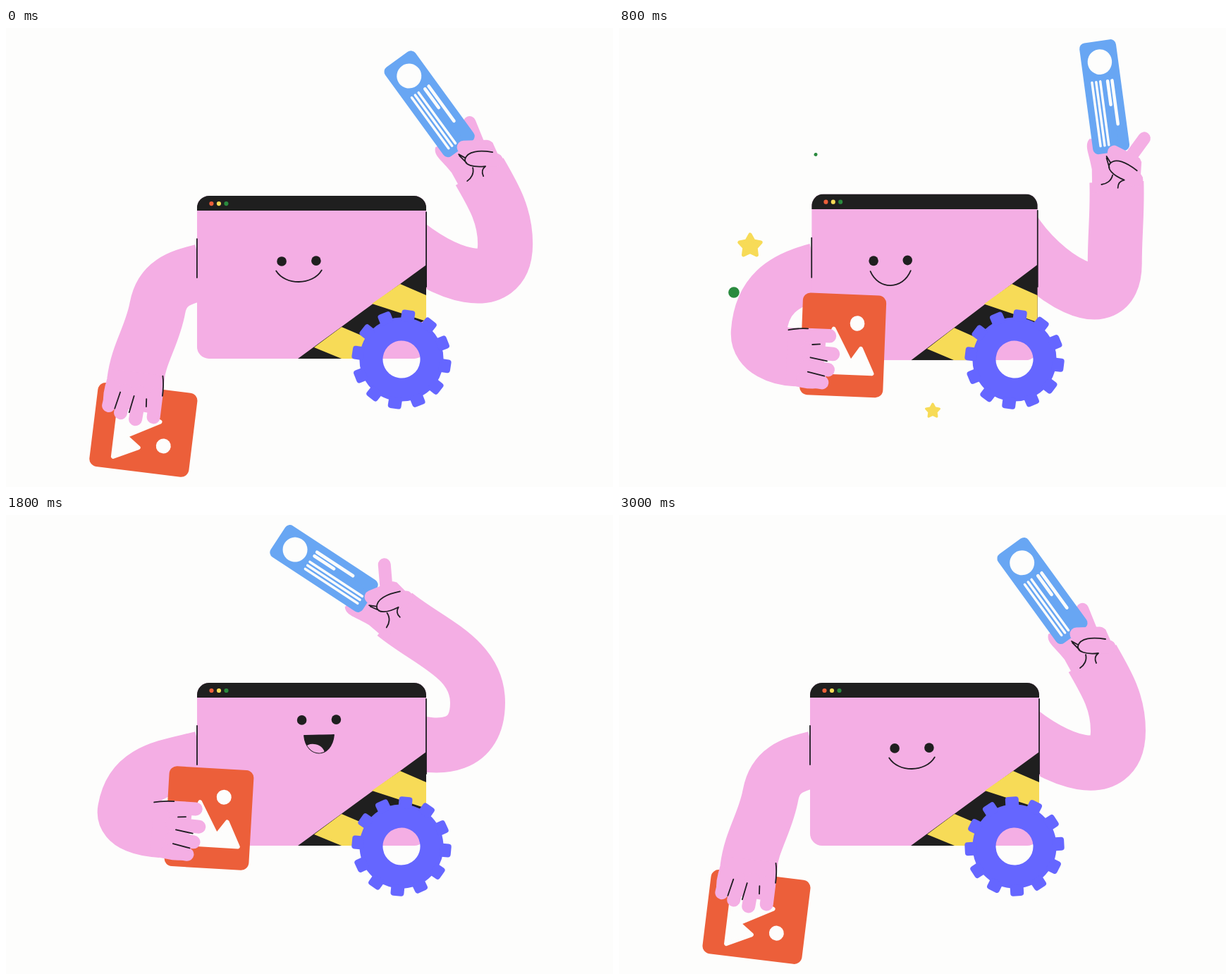
Write an HTML page that moves like this. It is 861 px wide and 651 px high and loops after 3.05 s.

```html
<!DOCTYPE html>
<html lang="en">
<head>
<meta charset="utf-8">
<title>Busy window</title>
<style>
html, body { margin: 0; width: 100%; height: 100%; overflow: hidden; background: #fdfdfc; }
svg { display: block; width: 861px; height: 651px; }
.pink { fill: #f4aee4; }
.arm { fill: none; stroke: #f4aee4; }
.round { stroke-linecap: round; }
.ink { fill: none; stroke: #1f1d22; stroke-width: 1.8; stroke-linecap: round; stroke-linejoin: round; }
.white { fill: none; stroke: #fdfdfc; stroke-linecap: round; }
</style>
</head>
<body>
<svg viewBox="0 0 861 651">
  <defs>
    <clipPath id="frame"><rect x="271" y="238" width="325" height="231" rx="17"/></clipPath>
    <clipPath id="lips"><path id="lipShape"/></clipPath>
  </defs>
  <g id="figure">
    <path id="armL" class="arm" stroke-width="80"/>
    <path id="armR" class="arm" stroke-width="78"/>
    <g clip-path="url(#frame)">
      <path class="pink" d="M271 238H596V469H271Z"/>
      <path fill="#1f1f1f" d="M271 238H596V259H271ZM414 469L596 336V413L508 469Z"/>
      <path fill="#f7db57" d="M559 363L596 379V416L519 391ZM476 424L530 447L508 469H476L437 453Z"/>
    </g>
    <circle cx="291.5" cy="249" r="3.1" fill="#ec5f3a"/>
    <circle cx="302" cy="249" r="3.1" fill="#f7db57"/>
    <circle cx="312.5" cy="249" r="3.1" fill="#2a8a3e"/>
    <path class="ink" d="M271 299V354M596 261V367"/>

    <g id="eyes">
      <g id="open" fill="#1f1f1f"><circle cx="-24.4" cy=".4" r="6.8"/><circle cx="24.4" cy="-.4" r="6.8"/></g>
      <path id="shut" class="ink" style="stroke-width:3.4" d="M-41 2Q-24 -9 -8 1M7 1Q24 -10 41 1"/>
    </g>
    <g id="mouth">
      <path id="grin" class="ink"/>
      <g clip-path="url(#lips)"><ellipse id="tongue" class="pink" cx="-2" rx="15" transform="rotate(12)"/></g>
    </g>

    <g id="handL">
      <rect x="-60" y="-71" width="120" height="142" rx="11" fill="#ec5f3a"/>
      <path fill="#fdfdfc" stroke="#fdfdfc" stroke-width="6" stroke-linejoin="round" d="M-40 38L-14 -22L12 24L26 4L43 38Z"/>
      <circle cx="19.5" cy="-31" r="10.5" fill="#fdfdfc"/>
      <path class="pink" d="M-80 -21L-50 -21L-24 -20L-28 60Q-40 64 -58 61L-80 58Z"/>
      <path class="arm round" stroke-width="19" d="M-52 -12H-19.500M-52 11L-13.500 13M-52 32L-20 35M-56 50L-28 53"/>
      <path class="ink" d="M-79 -18Q-68 -21 -51 -21M-44 1L-33 0M-46 19L-22 23M-49 39L-25 44"/>
    </g>

    <g id="handR">
      <path id="thumb" class="arm round" stroke-width="18"/>
      <path class="pink" d="M609 169C606 181 618 187 632 205L648 234L704 193L690 162L630 158Z"/>
      <g transform="translate(600.5 107.5) rotate(54)">
        <path id="sheet" fill="#68a6f3" stroke="#68a6f3" stroke-width="16" stroke-linejoin="round"/>
        <circle id="badge" r="17.5" fill="#fdfdfc"/>
        <path id="heads" class="white" stroke-width="4.6"/>
        <path id="rows" class="white" stroke-width="3.5"/>
      </g>
      <path class="arm round" stroke-width="19" d="M649 169L682 168M660 187H695"/>
      <path class="ink" d="M690 176C672 173 654 174 651 186C650 194 662 198 680 196C675 200 674 204 677 210M642 179L651 184M643 181L653 191M662 198C664 206 660 213 654 217"/>
    </g>
  </g>
  <g id="gear" fill="#6566ff"><circle r="43" fill="none" stroke="#6566ff" stroke-width="33"/></g>
  <g id="confetti"></g>
</svg>
<script>
const LOOP = 3050, TEETH = 12, RAD = Math.PI / 180;
const YELLOW = '#f7db57', GREEN = '#2a8a3e';
const $ = id => document.getElementById(id);
const set = (el, attrs) => { for (const k in attrs) el.setAttribute(k, attrs[k]); };
const make = (tag, attrs, parent) => {
  const el = document.createElementNS('http://www.w3.org/2000/svg', tag);
  set(el, attrs);
  return parent.appendChild(el);
};

// Each key: time, then the pose.
const keys = {
  // card x, y, turn, elbow x, y
  left: [
    [0, 195, 570, 97, 215, 397],
    [300, 114, 538, 135.6, 217, 398],
    [800, 316, 448, 2.3, 195, 430],
    [1400, 307, 450, 0, 190, 426],
    [1800, 288, 430, 3.3, 170, 418],
    [2200, 289, 438, 8.5, 177, 411],
    [2850, 195, 570, 97, 215, 397]
  ],
  // card x, y, turn, thumb angle, elbow x, y
  right: [
    [0, 600.5, 107.5, 54, -112, 708, 306],
    [300, 617, 102.7, 58, -112, 708, 309],
    [800, 692, 103, 82, -81, 707, 335],
    [1125, 738, 110, 115, -81, 707, 335],
    [1400, 433, 225, -24.3, -42, 669, 235],
    [1800, 451, 76, 33.3, -74, 669, 266],
    [2200, 414, 188, -2, -95, 679, 233],
    [2850, 600.5, 107.5, 54, -112, 708, 306]
  ],
  // x, eye y, mouth y, mouth half width, depth, opening
  face: [
    [0, 415.5, 330.5, 344, 32.3, 16, 0],
    [300, 415.5, 330.5, 344, 32.3, 16, 0],
    [800, 384.5, 330.5, 345, 29, 20, 0],
    [1400, 435.5, 299, 316.5, 25.5, 15.5, 0],
    [1800, 444, 290.5, 312.5, 21, 25, 1],
    [2200, 444.5, 286, 302, 21, 15.5, 1],
    [2700, 415.5, 330.5, 344, 32.3, 16, 0]
  ]
};

// Smooth interpolation that never overshoots a key.
function sample(rows, t) {
  const last = rows.length - 1;
  if (t >= rows[last][0]) return rows[last].slice(1);
  let i = 0;
  while (t >= rows[i + 1][0]) i++;
  const span = rows[i + 1][0] - rows[i][0], u = (t - rows[i][0]) / span, v = u * u, w = v * u;
  return rows[i].slice(1).map((a, n) => {
    const value = j => rows[j][n + 1];
    const slope = j => (value(j + 1) - value(j)) / (rows[j + 1][0] - rows[j][0]);
    const tangent = j => {
      if (j === 0 || j === last) return 0;
      const p = slope(j - 1), q = slope(j);
      return p * q > 0 ? 2 * p * q / (p + q) : 0;
    };
    return a + (value(i + 1) - a) * (3 * v - 2 * w) + span * (tangent(i) * (w - 2 * v + u) + tangent(i + 1) * (w - v));
  });
}

// Rises from 0 to 1 and back between two times.
const pulse = (t, from, to) => t > from && t < to ? Math.sin(Math.PI * (t - from) / (to - from)) : 0;

function spin(x, y, deg) {
  const c = Math.cos(deg * RAD), s = Math.sin(deg * RAD);
  return [x * c - y * s, x * s + y * c];
}

const step = ([x, y], angle, length) => {
  const [dx, dy] = spin(length, 0, angle);
  return [x + dx, y + dy];
};
const gap = (a, b) => Math.hypot(a[0] - b[0], a[1] - b[1]);

// Two smooth curves: shoulder to elbow, elbow to wrist. Angles point along the arm.
function limb(el, shoulder, a, elbow, b, wrist, c, reach) {
  const upper = gap(shoulder, elbow) * reach, fore = gap(elbow, wrist) * .37;
  set(el, { d: `M${shoulder}C${step(shoulder, a, upper)},${step(elbow, b, -upper)},${elbow}` +
    `C${step(elbow, b, fore)},${step(wrist, c, -fore)},${wrist}` });
}

function drawLeft(t) {
  const [x, y, turn, ex, ey] = sample(keys.left, t);
  const [dx, dy] = spin(-67, 20, turn), shoulder = [278, 346], wrist = [x + dx, y + dy];
  const lean = Math.atan2(wrist[1] - shoulder[1], .3 * (wrist[0] - shoulder[0])) / RAD;
  limb($('armL'), shoulder, 166, [ex, ey], lean, wrist, turn, .43);
  set($('handL'), { transform: `translate(${x} ${y}) rotate(${turn})` });
}

// The ticket curls away from its held end.
function curl(x, y, bend) {
  if (bend < 1e-3) return [x, y];
  const k = bend / 156, a = k * (x - 78);
  return [78 + Math.sin(a) / k + Math.sin(a) * y, (Math.cos(a) - 1) / k + Math.cos(a) * y];
}

function curve(x1, x2, y, bend, cmd = 'M') {
  const a = curl(x1, y, bend), b = curl(x2, y, bend), m = curl((x1 + x2) / 2, y, bend);
  return `${cmd}${a}Q${m.map((v, i) => 2 * v - (a[i] + b[i]) / 2)},${b}`;
}

function drawRight(t) {
  const [x, y, turn, thumb, ex, ey] = sample(keys.right, t);
  const tilt = turn - 54, [dx, dy] = spin(71, 96, tilt);
  // The shoulder rolls as the elbow drops.
  const drop = ey - 235;
  limb($('armR'), [560, 331 - .45 * drop], .58 * drop, [ex, ey], -90, [x + dx, y + dy], tilt - 120, .52);
  set($('handR'), { transform: `translate(${x} ${y}) rotate(${tilt}) translate(-600.5 -107.5)` });
  set($('thumb'), { d: `M672 170l${spin(39, 0, thumb)}` });

  const bend = .5 * pulse(t, 1950, 2450), [cx, cy] = curl(-49, 0, bend);
  set($('sheet'), { d: curve(-70, 70, -18.5, bend) + curve(70, -70, 18.5, bend, 'L') + 'Z' });
  set($('badge'), { cx, cy });
  set($('heads'), { d: curve(-21, 40, -14, bend) + curve(-21, 12, -7.5, bend) });
  set($('rows'), { d: [3, 9, 15].map(v => curve(-22, 67, v, bend)).join('') });
}

function drawFace(t) {
  const [x, eyeY, mouthY, w, depth, gape] = sample(keys.face, t);
  const shut = t >= 2050 && t < 2450;
  set($('eyes'), { transform: `translate(${x} ${eyeY})` });
  $('open').style.display = shut ? 'none' : '';
  $('shut').style.display = shut ? '' : 'none';
  const d = depth * 4 / 3, top = d * (1 - gape), k = w * (.6 + .25 * gape);
  const shape = `M${-w} .5C${-k} ${d} ${k} ${d} ${w} -.5C${k} ${top} ${-k} ${top} ${-w} .5Z`;
  set($('mouth'), { transform: `translate(${x} ${mouthY})` });
  set($('grin'), { d: shape });
  $('grin').style.fill = gape > .02 ? '#1f1f1f' : 'none';
  set($('lipShape'), { d: shape });
  set($('tongue'), { cy: depth * .98, ry: depth * .44 * gape });
}

for (let i = 0; i < TEETH; i++) {
  make('rect', { x: 54, y: -9.5, width: 16.5, height: 19, rx: 4, transform: `rotate(${i * 360 / TEETH})` }, $('gear'));
}

const star = Array.from({ length: 10 }, (_, i) => spin(i % 2 ? .46 : .86, 0, i * 36 - 90)).join(' ');
const LIFE = 480;
// x, y, size, start, colour; yellow bits are stars.
const bits = [
  [186, 309, 18.5, 560, YELLOW],
  [445, 543, 11.5, 560, YELLOW],
  [163, 375, 7.8, 560, GREEN],
  [284, 185, 5, 400, GREEN],
  [342, 204, 19.5, 1960, YELLOW],
  [456, 110, 11.5, 1960, YELLOW],
  [405, 72, 6.5, 2165, '#4c62a8'],
  [423, 522, 6.5, 2165, GREEN]
].map(([x, y, size, from, fill]) => {
  const el = fill === YELLOW
    ? make('polygon', { points: star, fill, stroke: fill, 'stroke-width': .28, 'stroke-linejoin': 'round' }, $('confetti'))
    : make('circle', { r: 1, fill }, $('confetti'));
  return { el, x, y, size, from };
});

function drawBits(t) {
  for (const { el, x, y, size, from } of bits) {
    const u = (t - from) / LIFE - .5, scale = size * pulse(t, from, from + LIFE);
    const px = x + (x - 433) * .1 * u, py = y + (y - 350) * .1 * u;
    set(el, { transform: `translate(${px} ${py}) rotate(${50 * u}) scale(${scale})` });
  }
}

function draw(now) {
  const t = now % LOOP;
  // A quick squash that springs back.
  const q = t < 900 ? 1.9 * Math.sin(t / 900 * 2 * Math.PI) * Math.exp(-t / 600) : 0;
  set($('figure'), { transform: `translate(433.5 361) scale(${1 + .043 * q} ${1 - .065 * q}) translate(-433.5 -361)` });
  drawLeft(t);
  drawRight(t);
  drawFace(t);
  drawBits(t);
  set($('gear'), { transform: `translate(561 470) rotate(${Math.max(0, t - 50) / LOOP * 360 - 81.5})` });
}

const begin = performance.now();
function tick() {
  draw(performance.now() - begin);
  requestAnimationFrame(tick);
}
tick();
</script>
</body>
</html>
```
